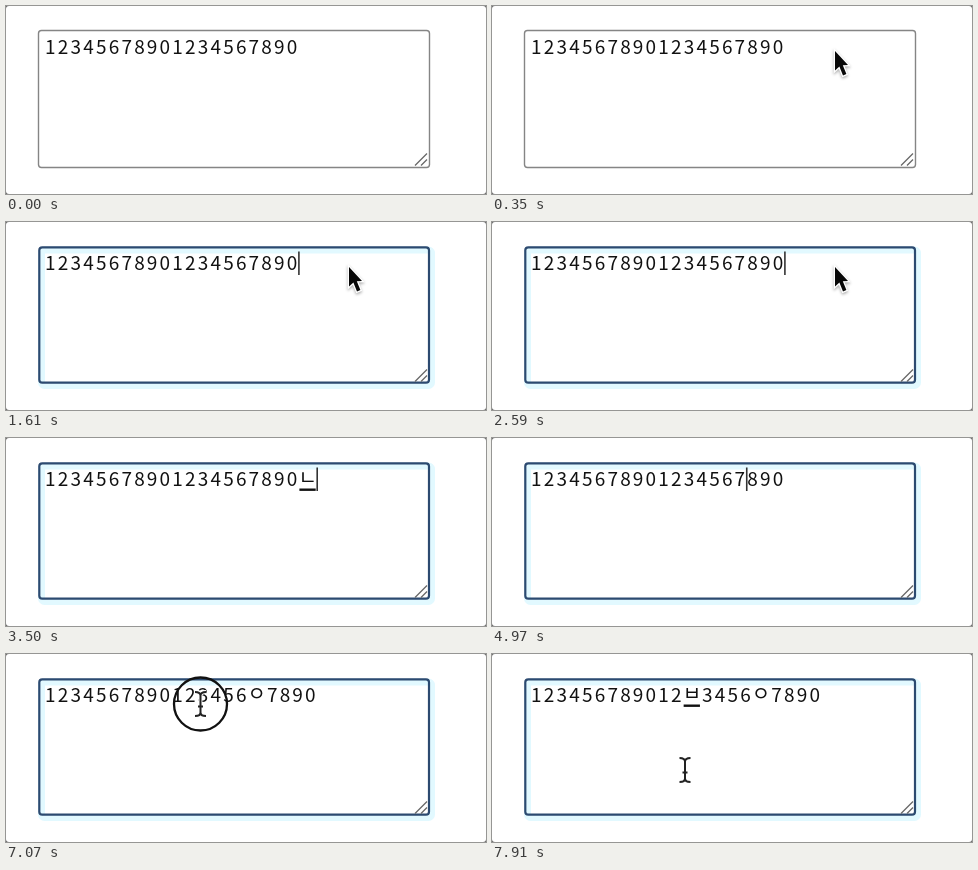
These frames come from a looping animation (480x188 px, 8 s). An HTML page with a canvas:

```html
<!DOCTYPE html>
<html lang="ko">
<head>
<meta charset="utf-8">
<style>
html, body { margin: 0; width: 100%; height: 100%; overflow: hidden; background: #666; }
canvas { display: block; border-radius: 3px; }
</style>
</head>
<body>
<canvas id="stage" width="480" height="188"></canvas>
<script>
const c = document.getElementById('stage').getContext('2d');
const LOOP = 8000, TICK = 70, BLINK = 515, ARROW_KEY = 233;
const LEFT = 38, DIGIT = 12.72, JAMO = 18.3, BASE = 48;
const DIGITS = '1234567890'.repeat(2);
const FONT = '"Noto Sans CJK KR", "Noto Sans CJK", "Noto Sans CJK JP", sans-serif';

const isJamo = ch => ch > '9';
const insert = (text, i, ch) => text.slice(0, i) + ch + text.slice(i);
const xOf = (text, i) =>
  [...text.slice(0, i)].reduce((x, ch) => x + (isJamo(ch) ? JAMO : DIGIT), LEFT);

// Text, caret index, time the caret starts blinking, index being composed.
function edit(t) {
  if (t < 490) return { text: DIGITS };
  if (t < 2800) return { text: DIGITS, caret: 20, since: 490 };
  if (t < 4480) return { text: DIGITS + 'ㄴ', caret: 21, since: 3500, composing: 20 };
  if (t < 5460) {
    const presses = Math.floor((t - 4480) / ARROW_KEY);
    return { text: DIGITS, caret: Math.max(16, 19 - presses), since: t };
  }
  const text = insert(DIGITS, 16, 'ㅇ');
  if (t < 6020) return { text, caret: 17, since: 5460, composing: 16 };
  if (t < 7140) return { text };
  if (t < 7350) return { text, caret: 12, since: 7140 };
  return { text: insert(text, 12, 'ㅂ'), caret: 13, since: 7350, composing: 12 };
}

function glide(t, start, end, [x0, y0], [x1, y1]) {
  const p = Math.min(1, Math.max(0, (t - start) / (end - start)));
  const e = p * (2 - p);
  return [x0 + (x1 - x0) * e, y0 + (y1 - y0) * e];
}

// The pointer hides while typing.
function pointer(t) {
  if (t < 140 || t >= 2800 && t < 6020 || t >= 7350 && t < 7630) return [];
  if (t < 2800) return [arrow, ...glide(t, 140, 350, [81, 149], [343, 45])];
  if (t < 6090) return [arrow, 343, 43];
  if (t < 7000) return [beam, ...glide(t, 6510, 6650, [344, 46], [196, 71])];
  if (t < 7350) return [beam, 194.5, 50];
  return [beam, ...glide(t, 7630, 7700, [193, 102], [193, 116])];
}

function path(points, close) {
  c.beginPath();
  points.forEach(([x, y]) => c.lineTo(x, y));
  if (close) c.closePath();
}

function stroke(color, width) {
  c.strokeStyle = color;
  c.lineWidth = width;
  c.stroke();
}

function outline(x, y, w, h, color, width) {
  c.beginPath();
  c.roundRect(x, y, w, h, 3);
  stroke(color, width);
}

function field(focused) {
  if (focused) {
    outline(35.5, 28, 390, 135.5, '#e2f9ff', 7);
    outline(33.3, 25.3, 389.7, 135.4, '#2c4a70', 2.2);
  } else {
    outline(32.5, 24.5, 391, 137, '#858585', 1.4);
  }
  for (const d of [12, 6]) {
    path([[421 - d, 159.5], [421, 159.5 - d]]);
    stroke('#666', 1.2);
  }
}

function line(text, composing) {
  c.fillStyle = '#111';
  [...text].forEach((ch, i) => {
    const x = xOf(text, i), jamo = isJamo(ch);
    c.font = `500 ${jamo ? 20 : 19}px ${FONT}`;
    c.fillText(ch, jamo ? x : x + 1.1, jamo ? BASE - 0.8 : BASE);
    if (i === composing) c.fillRect(x + 1, 50.5, JAMO - 2, 2.4);
  });
}

function arrow() {
  path([[0, 0], [0, 19.5], [4.4, 15.6], [8, 24.5], [11.4, 23], [7.8, 14.3], [13, 14]], true);
  c.shadowColor = '#0005';
  c.shadowBlur = 3;
  c.shadowOffsetY = 1.5;
  stroke('#fff', 2.6);
  c.shadowColor = 'transparent';
  c.fillStyle = '#080808';
  c.fill();
}

function beam() {
  c.beginPath();
  for (const s of [-1, 1]) {
    c.moveTo(-5.5, s * 12);
    c.quadraticCurveTo(0, s * 12, 0, s * 8.5);
    c.quadraticCurveTo(0, s * 12, 5.5, s * 12);
  }
  c.moveTo(0, -9);
  c.lineTo(0, 9);
  c.moveTo(-2.5, 2.5);
  c.lineTo(2.5, 2.5);
  stroke('#fff', 3.8);
  stroke('#222', 2);
}

// A ring that shrinks for two ticks after a click.
function ring(t, start, x, y, r) {
  const ticks = (t - start) / TICK;
  if (ticks < 0 || ticks >= 2) return;
  c.beginPath();
  c.arc(x, y, r * (1 - ticks * 0.22), 0, 7);
  stroke('#111', 2.3);
}

function draw(now) {
  const t = Math.floor(now % LOOP / TICK) * TICK;
  const { text, caret, since, composing } = edit(t);
  const [shape, x, y] = pointer(t);

  c.fillStyle = '#fff';
  c.fillRect(0, 0, 480, 188);
  field(t >= 490);
  line(text, composing);
  if (caret && (t < since || Math.floor((t - since) / BLINK) % 2 === 0)) {
    c.fillStyle = '#333';
    c.fillRect(xOf(text, caret) - 0.3, 29.5, 1.6, 23.5);
  }
  if (shape) {
    c.save();
    c.translate(x, y);
    shape();
    c.restore();
  }
  ring(t, 490, 342, 46, 34.3);
  ring(t, 7070, 194.5, 50, 26.5);
  requestAnimationFrame(draw);
}
requestAnimationFrame(draw);
</script>
</body>
</html>
```
